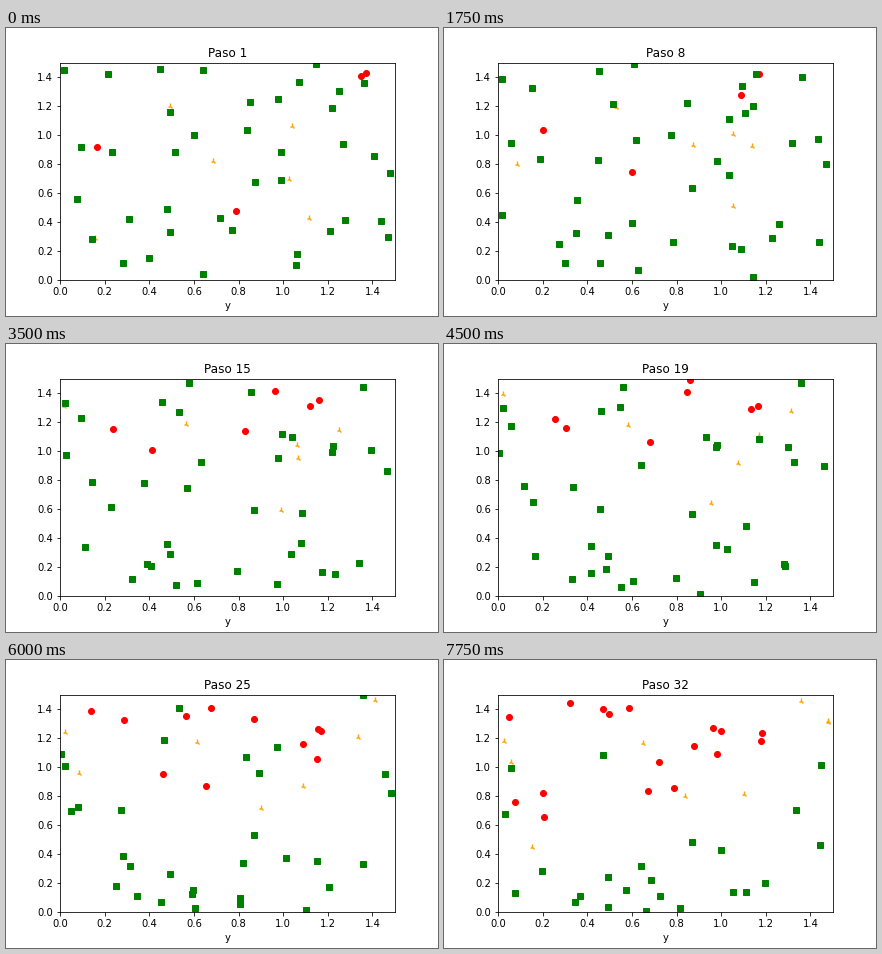
Write a matplotlib script that moves like this. It is 432x288 px and loops after 8 s.

```python
import numpy as np
import matplotlib.pyplot as plt
from matplotlib.animation import FuncAnimation

W, H, DPI = 432, 288, 72
STEPS, INTERVAL = 32, 250
WORLD = 1.5
GREEN, RED, ORANGE = range(3)
COLS, ROWS = 8, 4
FIRST = {RED: 4, ORANGE: 6}
LAST = {RED: 17, ORANGE: 9}

# Leading walkers: x, y and the step taken along each axis.
RED_LEADS = [
    (0.166, 0.917, 0.005, 0.017), (0.789, 0.476, -0.027, 0.038),
    (1.349, 1.407, -0.037, -0.019), (1.371, 1.428, -0.029, -0.001)]
ORANGE_LEADS = [
    (0.157, 0.290, -0.010, 0.073), (0.493, 1.200, 0.005, -0.001),
    (0.685, 0.821, 0.027, 0.016), (1.039, 1.062, 0.002, -0.008),
    (1.026, 0.697, 0.016, 0.032), (1.116, 0.428, -0.009, 0.012)]
GREEN_LEADS = [
    (1.147, 1.490, 0.001, -0.010), (1.478, 0.738, -0.001, 0.009),
    (1.219, 1.187, -0.016, -0.005), (0.493, 1.159, 0.003, 0.008),
    (0.977, 1.249, -0.029, -0.036), (0.493, 0.331, 0.000, -0.003),
    (1.062, 0.179, -0.002, 0.008)]


def scatter_walkers(seed):
    """One walker at a random spot of each grid cell, with a random drift."""
    rng = np.random.default_rng(seed)
    cells = np.array([(c, r) for r in range(ROWS) for c in range(COLS)])
    start = (cells + rng.uniform(0.08, 0.92, cells.shape)) * WORLD / (COLS, ROWS)
    return np.hstack([start, rng.normal(0, 0.014, cells.shape)])


walkers = np.vstack([RED_LEADS, ORANGE_LEADS, GREEN_LEADS, scatter_walkers(5)])


def positions(step):
    """Straight paths that bounce off the walls."""
    path = walkers[:, :2] + step * walkers[:, 2:]
    return WORLD - np.abs(path % (2 * WORLD) - WORLD)


def quota(kind, step):
    growth = (step / (STEPS - 1)) ** 2.2
    return int(FIRST[kind] + (LAST[kind] - FIRST[kind]) * growth)


def spread():
    """Kinds at every step: the green walker closest to a group joins it."""
    kinds = np.full(len(walkers), GREEN)
    kinds[:FIRST[RED]] = RED
    kinds[FIRST[RED]:FIRST[RED] + FIRST[ORANGE]] = ORANGE
    history = []
    for step in range(STEPS):
        spot = positions(step)
        for kind in (RED, ORANGE):
            while np.sum(kinds == kind) < quota(kind, step):
                green = np.flatnonzero(kinds == GREEN)
                gaps = spot[green][:, None] - spot[kinds == kind][None]
                nearest = np.hypot(gaps[..., 0], gaps[..., 1]).min(axis=1)
                kinds[green[nearest.argmin()]] = kind
        history.append(kinds.copy())
    return history


history = spread()

fig, ax = plt.subplots(figsize=(W / DPI, H / DPI), dpi=DPI)
fig.subplots_adjust(left=0.125, right=0.9, bottom=0.125, top=0.88)
ax.set(xlim=(0, WORLD), ylim=(0, WORLD), xlabel="y")
ax.set_xticks(np.arange(0, WORLD, 0.2))
ax.set_yticks(np.arange(0, WORLD, 0.2))
title = ax.set_title("Paso 1")

dots = {
    RED: ax.plot([], [], "o", color="red")[0],
    ORANGE: ax.plot([], [], "2", color="orange", markeredgewidth=1.4)[0],
    GREEN: ax.plot([], [], "s", color="green")[0],
}


def draw(step):
    spot, kinds = positions(step), history[step]
    for kind, line in dots.items():
        line.set_data(*spot[kinds == kind].T)
    title.set_text(f"Paso {step + 1}")
    return [*dots.values(), title]


anim = FuncAnimation(fig, draw, frames=STEPS, interval=INTERVAL, repeat=True, repeat_delay=0)
plt.show()
```
